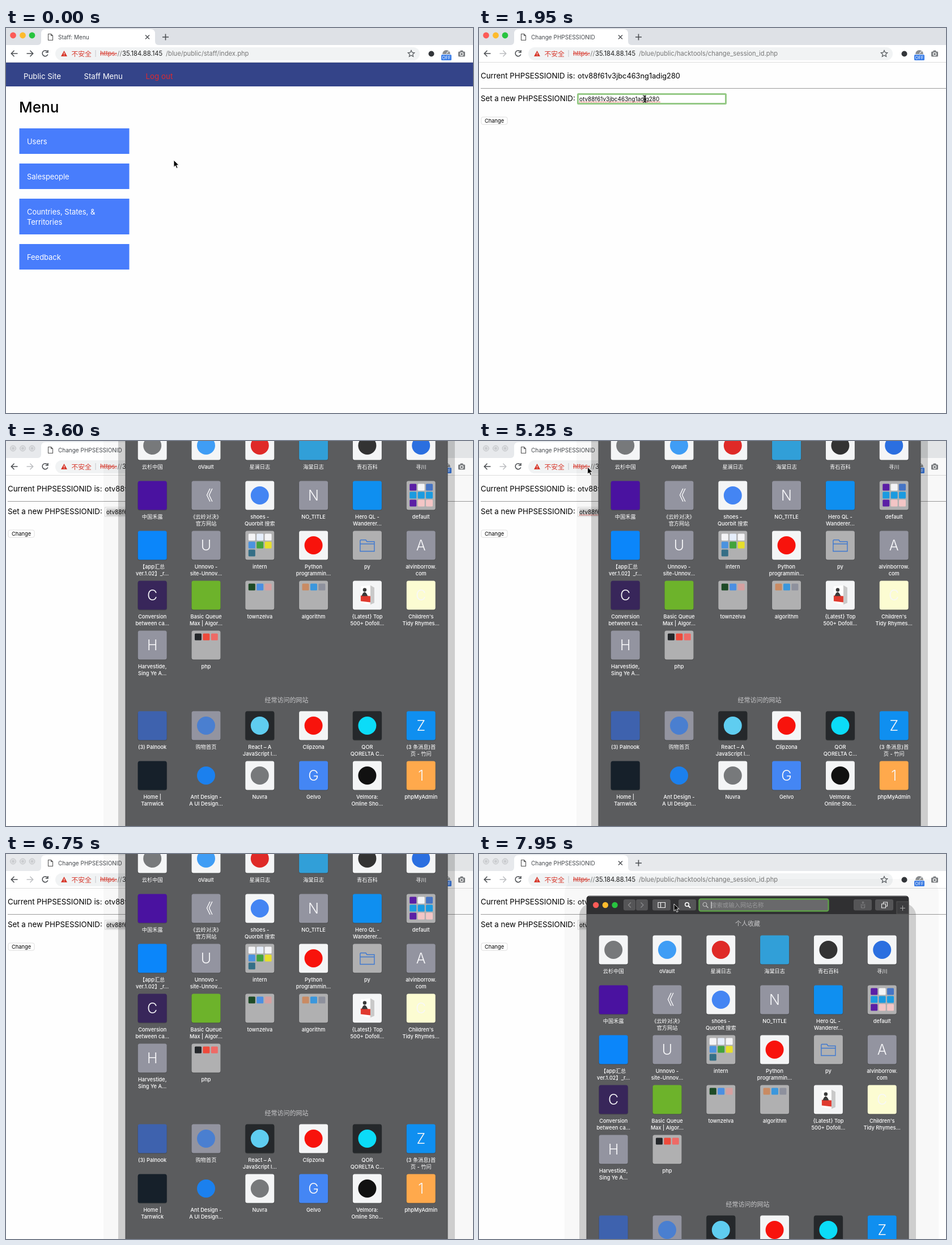
Write an HTML page that moves like this. It is 824 px wide and 679 px high and loops after 8 s.

```html
<!DOCTYPE html>
<html lang="en">
<head>
<meta charset="utf-8">
<title>Session change</title>
<style>
html, body { margin: 0; width: 100%; height: 100%; overflow: hidden; background: #fff; }
svg { display: block; width: 824px; height: 679px; font-family: Inter, "Noto Sans CJK SC", "Noto Sans CJK", sans-serif; white-space: pre; }
.label { font-size: 9.2px; font-weight: 500; }
</style>
</head>
<body>
<svg id="stage" viewBox="0 0 824 679"></svg>
<script>
const LOOP = 8000, STEP = 150;
const ID = 'otv88f61v3jbc463ng1adig280';
const stage = document.getElementById('stage');

// Markup helpers
const text = (x, y, s, size, fill = '#000', more = '') =>
  `<text x="${x}" y="${y}" font-size="${size}" fill="${fill}" ${more}>${s}</text>`;
const rect = (x, y, w, h, fill, r = 0, more = '') =>
  `<rect x="${x}" y="${y}" width="${w}" height="${h}" rx="${r}" fill="${fill}" ${more}/>`;
const dot = (x, y, r, fill, more = '') => `<circle cx="${x}" cy="${y}" r="${r}" fill="${fill}" ${more}/>`;
const line = (d, color, w = 1.5, more = '') =>
  `<path d="${d}" fill="none" stroke="${color}" stroke-width="${w}" ${more}/>`;
const group = (id, body) => `<g id="${id}">${body}</g>`;
const MID = 'text-anchor="middle"';
const LIGHTS = ['#fc5b57', '#fdbb2d', '#28c43f'];

// Main browser
function browser() {
  const x = [12.5, 29.5, 46];
  return rect(0, 0, 824, 679, '#fefefe') +
    rect(0, 0, 824, 30, '#dee1e6', 0, 'id="strip"') +
    group('lights', x.map((c, i) => dot(c, 13, 5.4, LIGHTS[i])).join('')) +
    group('dimLights', x.map(c => dot(c, 13, 4.9, '#dcdee1', 'stroke="#c2c4c7"') + dot(c, 13, 2.2, '#c9cbce')).join('')) +
    '<path d="M56 30q6 0 6-7V10q0-8 8-8h185q8 0 8 8v13q0 7 6 7z" fill="#fff"/>' +
    line('M74.500 10.500h5l3 3v8h-8zM79.500 10.500v3h3', '#555', 1.1) +
    text(92, 19.5, '', 10, '#45494d', 'id="title"') +
    line('M246 12.500l7 7m0-7l-7 7', '#4a4d51', 1.4) +
    line('M276 16h11M281.500 10.500v11', '#4a4d51', 1.6) +
    rect(0, 30, 824, 31, '#fff') + rect(0, 60, 824, 1, '#dcdcdc') +
    line('M20.500 45H9.500m5-5.200L9.300 45l5.200 5.200', '#4c4f53', 1.6) +
    line('M36.500 45h11m-5-5.200l5.200 5.200-5.200 5.200', '#4c4f53', 1.6, 'id="forward"') +
    line('M73 41.500a5 5 0 1 0 .8 5M74 39v4h-4.200', '#4c4f53', 1.6) +
    rect(87, 34, 643, 23, '#f1f3f4', 11.5, 'id="pill"') +
    rect(165.5, 38, 364.5, 14.5, '#c5e3bc', 0, 'id="urlPick"') +
    '<path d="M102.500 40l5.500 10h-11z" fill="#d7382c"/>' + rect(102, 43.5, 1.1, 3, '#fff') + rect(102, 47.7, 1.1, 1, '#fff') +
    text(115.5, 49.5, '不安全', 11.8, '#d7382c') + rect(157.5, 39, 1, 12, '#c3c6c9') +
    text(166, 49, 'https:', 11.1, '#d7382c', 'id="scheme" text-decoration="line-through"') +
    text(196.5, 49, '//', 11.2, '#777', 'class="soft"') + text(205, 49, '35.184.88.145', 11.2, '#222') +
    text(282, 49, '', 11.2, '#777', 'id="path" class="soft"') +
    line('M715 39.500l1.700 3.700 4 .4-3 2.700.9 4-3.600-2.100-3.600 2.100.9-4-3-2.700 4-.4z', '#54585c', 1.2) +
    dot(750.5, 45.5, 5, '#33363a') +
    '<path d="M770 46a7 7 0 0 1 14 0z" fill="#8a8d90"/>' + line('M777 45l4-4', '#eee', 1.2) +
    rect(768, 47, 18, 10, '#3d7fe8', 1.5) + text(777, 55, 'OFF', 7.6, '#fff', MID) +
    rect(798, 41.5, 12, 9, '#7c7f82', 1.5) + rect(801.5, 39.5, 5, 3, '#7c7f82', 1) +
    dot(804, 46, 2.6, '#7c7f82', 'stroke="#fff" stroke-width="1.1"');
}

function menuPage() {
  const items = [[177, 45, 'Users'], [239, 45, 'Salespeople'], [301, 63, 'Countries, States, &amp;'], [381, 45, 'Feedback']];
  return rect(0, 61, 824, 42, '#344489') + group('menuBody',
    text(31, 90, 'Public Site', 13.3, '#fff') + text(137.5, 90, 'Staff Menu', 13.2, '#fff') +
    text(246.5, 90, 'Log out', 13.4, '#dc2a30') +
    text(23, 149, 'Menu', 26, '#000', 'font-weight="500"') +
    items.map(([y, h, s]) => rect(23.5, y, 194, h, '#487dfc') + text(37, y + 27.5, s, 12.9, '#fff')).join('') +
    text(37, 346.5, 'Territories', 12.9, '#fff'));
}

function sessionPage() {
  return text(3, 89, 'Current PHPSESSIONID is:', 13.3) + text(174, 89, ID, 12.8) +
    rect(3, 106, 821, 1, '#9b9b9b') +
    text(3, 129, 'Set a new PHPSESSIONID:', 13.3) +
    rect(174.5, 117, 260, 16, '#fff', 0, 'stroke="#d9d9d9"') +
    rect(174.5, 116.5, 261, 17, '#fff', 1, 'id="ring" stroke="#95c986" stroke-width="3"') +
    rect(177, 119, 144, 13, '#d6d6d6', 0, 'id="pick"') +
    text(177, 129, ID, 10) +
    line('M177 130.500h143', '#e0453c', 1.4, 'id="spell" stroke-dasharray="1.500 1.500"') +
    rect(293, 120, 1, 11, '#000', 0, 'id="caret"') +
    rect(4, 157, 46, 13, '#fff', 3, 'stroke="#dedede"') +
    text(27, 166.8, 'Change', 9.3, '#000', MID);
}

// Bookmark tiles: background, label lines, then a letter, dot colour, drawing or list of mini tiles
const GREY = '#9394a0', FOLDER = '#b0b0b1', PAPER = '#f4f5f6', DARK = '#25282b';
const FAVOURITES = [
  [PAPER, '云杉中国', '#77797b'], [PAPER, 'oVault', '#3f9df5'], [PAPER, '星澜日志', '#df2a27'],
  ['#319fd8', '海棠日志'], [PAPER, '青石百科', '#333'], [PAPER, '寻川', '#2b6fe0'],
  ['#4a12a0', '中国禾露'], [GREY, '《云岭对决》~官方网站', '《'], [PAPER, 'shoes -~Quorbit 搜索', '#4485f3'],
  [GREY, 'NO_TITLE', 'N'], ['#0f8ff0', 'Hero QL -~Wanderer...'],
  [FOLDER, 'default', ['#5b1fa5', '#f4f4f6', '#4674c4', '#1b9be0', '#1b9be0', '#1b9be0', '#5b1fa5', '#f3c5c5', '#f3c5c5']],
  ['#0b86fa', '【app汇总~ver.1.02】_r...'], [GREY, 'Unnovo -~site-Unnov...', 'U'],
  [FOLDER, 'intern', ['#f4f4f6', '#e6eefb', '#f4f4f6', '#4b93e0', '#43a33c', '#e7df2c', '#356f86']],
  [PAPER, 'Python~programmin...', '#f8130c'], [FOLDER, 'py', 'folder'], [GREY, 'alvinborrow.~com', 'A'],
  ['#38265a', 'Conversion~between ca...', 'C'], ['#6db32b', 'Basic Queue~Max | Algor...'],
  [FOLDER, 'townzelva', ['#1d4a26', '#4b8fe2', '#d5a0a0']], [FOLDER, 'algorithm', ['#c98b63', '#3b97dc', '#8e919d']],
  [PAPER, '{Latest} Top~500+ Dofoll...', 'book'], ['#fcfcd2', "Children's~Tidy Rhymes...", 'C'],
  [GREY, 'Harvestide,~Sing Ye A...', 'H'], [FOLDER, 'php', ['#24272a', '#ee4a3b', '#ee6a66']]
];
const FREQUENT = [
  ['#3e62ae', '(3) Palnook'], [GREY, '购物首页', '#4a7fd0'], [DARK, 'React – A~JavaScript l...', '#5fcdf0'],
  [PAPER, 'Clipzona', '#f8130c'], [DARK, 'QOR~QORELTA C...', '#0bdcf8'], ['#0f8ff0', '(3 条消息)首~页 - 竹问', 'Z'],
  ['#16202a', 'Home |~Tarnwick'], ['none', 'Ant Design -~A UI Design...', '#1b80ee'], [PAPER, 'Nuvra', '#77797b'],
  ['#4486f4', 'Gelvo', 'G'], [PAPER, 'Velmora:~Online Sho...', '#111'], ['#ffa94c', 'phpMyAdmin', '1']
];
const DRAWN = {
  folder: line('M13 17v19h25V19H25l-2-3h-9z M13 23h25', '#3d77d0', 1.4),
  book: '<path d="M14 10l17-2v34l-17-3z" fill="#fff"/><path d="M31 8l7 4v27l-7 3z" fill="#c9c9c9"/>' +
    '<path d="M14 26l17 1v11l-17-2z" fill="#e03a2f"/>' + dot(21, 16, 3.2, '#3a3a3a') + '<path d="M15.500 27q5-14 11 0z" fill="#3a3a3a"/>'
};

function mark(m) {
  if (!m) return '';
  if (Array.isArray(m)) return m.map((c, i) => rect(5.5 + i % 3 * 14.4, 5 + (i / 3 | 0) * 14, 12, 12, c, 1.5)).join('');
  if (DRAWN[m]) return DRAWN[m];
  if (m[0] === '#') return dot(25.5, 25.5, 16, m);
  return text(25.5, 34, m, 25, '#f7f7f9', MID + ' font-weight="300"');
}

const tiles = (list, top) => list.map(([bg, label, m], i) =>
  `<g transform="translate(${21.7 + i % 6 * 94.8} ${top + (i / 6 | 0) * 88})">` +
  rect(-.5, 1, 52, 51, bg === 'none' ? bg : 'rgba(0,0,0,.2)', 4) + rect(0, 0, 51, 51, bg, 3.5) + mark(m) +
  label.split('~').map((s, k) => `<text class="label" x="25.500" y="${66 + k * 12}" fill="#fff" ${MID}>${s}</text>`).join('') +
  '</g>').join('');

// Second browser window, drawn from its own top left corner
function bookmarks() {
  const button = (x, w) => rect(x, 6, w, 19.5, '#555557', 3);
  return rect(-39, -30, 660, 930, 'rgba(0,0,0,.022)', 24) + rect(-13, 13, 594, 900, 'rgba(0,0,0,.17)', 22) +
    rect(0, 0, 568, 850, '#5b5c5e', 5, 'stroke="#4a4a4c"') +
    '<path d="M0 32V5q0-5 5-5h558q5 0 5 5v27z" fill="#303032"/>' + rect(3, 0, 562, 1, '#6c6c6e') +
    LIGHTS.map((c, i) => dot(16.2 + i * 16.7, 16, 5.2, c)).join('') +
    button(65, 21) + button(87, 21) + button(116, 32) + button(162, 31) + button(471, 32) + button(509, 32) +
    line('M78 11.500l-4.500 4.500 4.500 4.500M95.500 11.500l4.500 4.500-4.500 4.500', '#8c8c8e', 1.2) +
    line('M126 11.500h12.500v9H126zM130.500 11.500v9', '#eee', 1.2) +
    line('M179.500 17.500l3.500 3.500', '#fff', 2) + dot(177, 15, 3.3, 'none', 'stroke="#fff" stroke-width="1.600"') +
    rect(198.5, 5.5, 228, 21, '#69696b', 3, 'stroke="#5c9f47" stroke-width="2.400"') +
    dot(208.5, 15, 3.5, 'none', 'stroke="#ccc"') + line('M211 17.500l3.500 3.500', '#ccc', 1.2) +
    text(219, 20, '搜索或输入网站名称', 10.4, '#98989a') + rect(219.5, 10, 1, 12, '#eee', 0, 'id="searchCaret"') +
    line('M484.500 14v7h6v-7M487.500 18v-8m-2 2l2-2 2 2', '#838385', 1) +
    line('M520.500 14h7v7h-7zM523.500 14v-3h7v7h-3', '#eee', 1.1) +
    rect(547, 10, 21, 22, '#3d3d3f', 0, 'stroke="#555"') + line('M553 21.500h9M557.500 17v9', '#aaa', 1) +
    text(284, 53, '个人收藏', 11, '#c6c6c8', MID) + tiles(FAVOURITES, 69.5) +
    text(284, 547.5, '经常访问的网站', 11, '#c6c6c8', MID) + tiles(FREQUENT, 563.5);
}

stage.innerHTML = browser() + group('menu', menuPage()) + group('session', sessionPage()) +
  group('win', bookmarks()) +
  group('arrow', '<path d="M0 0v12.500l2.900-2.700 2 4.600 2.200-.9-2-4.600h4z" fill="#000" stroke="#fff" stroke-width=".9"/>') +
  group('beam', line('M-3-6q3 0 3 2 0-2 3-2M0-5V5M-3 6q3 0 3-2 0 2 3 2M-1.500.500h3', '#111', 1.2));

const el = {};
stage.querySelectorAll('[id]').forEach(e => el[e.id] = e);
const soft = stage.querySelectorAll('.soft');

// Linear path through [time, x, y] points
function along(keys, t) {
  let i = 0;
  while (i < keys.length - 2 && t >= keys[i + 1][0]) i++;
  const [a, b] = [keys[i], keys[i + 1]];
  const k = Math.min(1, Math.max(0, (t - a[0]) / (b[0] - a[0])));
  return [a[1] + (b[1] - a[1]) * k, a[2] + (b[2] - a[2]) * k];
}
const WINDOW = [[7200, 211, -87], [7350, 206, -50], [7500, 195, 62], [7650, 190, 79], [7950, 190, 74]];
const SWIPE = [[150, 0, 0], [300, -18, 0], [450, -11, 0], [600, -4, 0], [750, 0, 0]];
// Pointer phases: shape, start, end, path
const POINTER = [
  ['arrow', 0, 1650, [[1050, 296, 233], [1650, 292, 125]]],
  ['beam', 1650, 3150, [[1650, 292, 125], [3150, 292, 125]]],
  ['arrow', 3150, 3300, [[3150, 533, -3], [3300, 533, -3]]],
  ['arrow', 4650, 5700, [[4650, 290, -4], [5100, 191.5, 46]]],
  ['beam', 5700, 6150, [[5700, 222, 52], [5850, 245, 47.5]]],
  ['arrow', 7350, LOOP, [[7350, 351, 20], [7500, 344, 101], [7650, 344, 95], [7950, 344, 88]]]
];

const show = (name, on) => el[name].style.display = on ? '' : 'none';
const move = (name, [x, y]) => el[name].setAttribute('transform', `translate(${x} ${y})`);

function draw(now) {
  const t = Math.floor(now % LOOP / STEP) * STEP;
  const within = (a, b) => t >= a && t < b;
  const onMenu = t < 1050, covered = within(3600, 5400) || t >= 6750, urlActive = within(5400, 6750);

  show('menu', onMenu);
  show('session', !onMenu);
  move('menuBody', along(SWIPE, t));
  el.title.textContent = onMenu ? 'Staff: Menu' : 'Change PHPSESSIONID';
  el.path.textContent = '/blue/public/' + (onMenu ? 'staff/index.php' : 'hacktools/change_session_id.php');
  el.forward.setAttribute('stroke', onMenu ? '#4c4f53' : '#bdbfc2');

  el.strip.setAttribute('fill', covered ? '#e7e9ec' : '#dee1e6');
  show('lights', !covered);
  show('dimLights', covered);
  el.pill.setAttribute('fill', urlActive ? '#fff' : '#f1f3f4');
  el.pill.setAttribute('stroke', urlActive ? '#a9d49c' : 'none');
  el.pill.setAttribute('stroke-width', 2);
  show('urlPick', urlActive);
  el.scheme.setAttribute('fill', urlActive ? '#222' : '#d7382c');
  soft.forEach(e => e.setAttribute('fill', urlActive ? '#222' : '#777'));

  show('ring', within(1800, 3600));
  show('caret', within(1950, 2400));
  show('pick', t >= 2700);
  el.pick.setAttribute('fill', t < 3600 ? '#c5e3bc' : '#d6d6d6');
  show('spell', within(1800, 3600) || within(3750, 5400));

  show('win', covered);
  move('win', along(WINDOW, t));
  show('searchCaret', t >= 7650);

  show('arrow', false);
  show('beam', false);
  for (const [shape, from, to, path] of POINTER) if (within(from, to)) {
    show(shape, true);
    move(shape, along(path, t));
  }
}

const start = performance.now();
function frame() {
  draw(performance.now() - start);
  requestAnimationFrame(frame);
}
frame();
</script>
</body>
</html>
```
